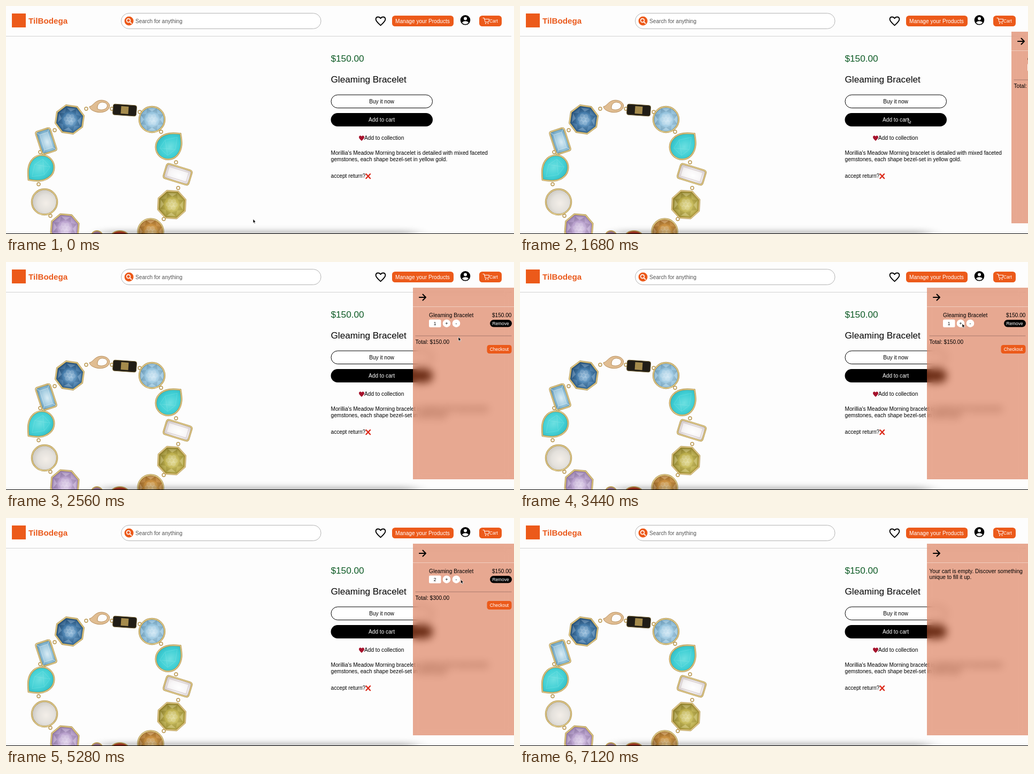
Animation, 950 px wide and 426 px high, one loop 7200 ms. Source, as an HTML page:

```html
<!DOCTYPE html>
<html lang="en">
<head>
<meta charset="utf-8">
<title>Product page with cart drawer</title>
<style>
  html, body { margin: 0; width: 100%; height: 100%; overflow: hidden; background: #fdfdfd; }
  #stage { position: relative; width: 950px; height: 426px; overflow: hidden; background: #fdfdfd; }
  svg { position: absolute; left: 0; top: 0; display: block; }
  text { font: 10.14px "Liberation Sans", Arial, sans-serif; fill: #000; white-space: pre; }
  .big { font-size: 17.2px; }
  .small { font-size: 8.4px; }
  .brand { font-size: 15.2px; font-weight: 700; fill: #ea5a1c; }
  .mid { text-anchor: middle; }
  .end { text-anchor: end; }
  .white { fill: #fff; }
  .orange { fill: #ec5a1a; }
  .line { fill: none; stroke: #000; stroke-linecap: round; stroke-linejoin: round; }
  #drawer {
    position: absolute; left: 761px; top: 48px; width: 189px; height: 358px; overflow: hidden;
    background: rgba(209, 85, 39, .5);
    -webkit-backdrop-filter: blur(8px); backdrop-filter: blur(8px);
  }
</style>
</head>
<body>
<div id="stage">
  <svg width="950" height="426" viewBox="0 0 950 426">
    <defs>
      <filter id="soft" x="-20%" y="-300%" width="140%" height="700%"><feGaussianBlur stdDeviation="16 6"/></filter>
    </defs>

    <!-- header -->
    <path d="M0 56.5H945" stroke="#d2d2d2"/>
    <rect class="orange" x="11" y="14" width="26" height="26"/>
    <text class="brand" x="42" y="33">TilBodega</text>
    <rect x="215.5" y="13.5" width="373.5" height="29" rx="14.5" fill="#fff" stroke="#b4b4b4"/>
    <circle class="orange" cx="230" cy="28" r="8.5"/>
    <g class="line" style="stroke:#fff" stroke-width="1.6"><circle cx="229" cy="27" r="3.4"/><path d="M231.6 29.6l3 3"/></g>
    <text x="242" y="31.5" style="fill:#555">Search for anything</text>
    <path class="line" stroke-width="1.9" d="M700.5 36.2C696 32 691.6 28.7 691.6 24.8C691.6 20 697.7 18.8 700.5 23.2C703.3 18.8 709.4 20 709.4 24.8C709.4 28.7 705 32 700.5 36.2Z"/>
    <rect class="orange" x="722" y="18" width="115" height="20" rx="5.5"/>
    <text class="white" x="728" y="31.5">Manage your Products</text>
    <circle cx="859" cy="26.3" r="9.3"/>
    <circle class="white" cx="859" cy="23.4" r="3"/>
    <path class="white" d="M853 31.2C854 27.2 864 27.2 865 31.2C862 34.6 856 34.6 853 31.2Z"/>
    <rect class="orange" x="885" y="18" width="42" height="20" rx="5.5"/>
    <path class="line" style="stroke:#fff" d="M892 22.5h2.2l2 7.5h6l1.6-5.5h-9"/>
    <circle class="white" cx="897" cy="32.5" r="1"/><circle class="white" cx="901.5" cy="32.5" r="1"/>
    <text class="small white" x="904" y="31">Cart</text>

    <g id="bracelet"></g>

    <!-- product details -->
    <text class="big" x="607.5" y="104" style="fill:#0c5a24">$150.00</text>
    <text class="big" x="607.5" y="143">Gleaming Bracelet</text>
    <rect x="608" y="166" width="189.5" height="24.5" rx="12.25" fill="#fff" stroke="#000"/>
    <text class="mid" x="702.5" y="181.5">Buy it now</text>
    <rect x="607.5" y="200" width="190.5" height="25" rx="12.5"/>
    <text class="mid white" x="702.5" y="216">Add to cart</text>
    <path fill="#a5122c" d="M665 252C662 249 660 247.3 660 245C660 241.7 664 241.3 665 243.8C666 241.3 670 241.7 670 245C670 247.3 668 249 665 252Z"/>
    <text x="670" y="250">Add to collection</text>
    <text x="607.5" y="278">Morillia's Meadow Morning bracelet is detailed with mixed faceted</text>
    <text x="607.5" y="289.5">gemstones, each shape bezel-set in yellow gold.</text>
    <text x="607.5" y="321">accept return?</text>
    <path d="M673.5 314l7.5 8M681 314l-7.5 8" stroke="#dc2c1c" stroke-width="2.5" stroke-linecap="round"/>

    <rect x="180" y="421" width="585" height="14" fill="#000" opacity=".3" filter="url(#soft)"/>
    <rect y="425" width="950" height="1"/>
  </svg>

  <div id="drawer">
    <svg width="189" height="358" viewBox="761 48 189 358">
      <path d="M761 83.5H950" stroke="#f1cdbf"/>
      <path class="line" stroke-width="2.1" d="M773 66H785M779.5 60.5L785 66L779.5 71.5"/>
      <g id="filled">
        <text x="791" y="102.5">Gleaming Bracelet</text>
        <text class="end" x="945.5" y="102.5">$150.00</text>
        <rect class="white" x="791" y="107.5" width="22.5" height="14.5" rx="2.5"/>
        <text id="count" class="small mid" x="802" y="117.5">1</text>
        <circle class="white" cx="824" cy="114.7" r="7.3"/><text class="small mid" x="824" y="117.5">+</text>
        <circle class="white" cx="842" cy="114.7" r="7.3"/><text class="small mid" x="842" y="117.5">-</text>
        <rect x="905" y="108" width="41" height="13.5" rx="6.75"/>
        <text class="small mid white" x="925" y="117.5">Remove</text>
        <path d="M765.5 138H945.5" stroke="#c8917f" stroke-width="2"/>
        <text id="total" x="765.5" y="152.5">Total: $150.00</text>
        <rect class="orange" x="899.5" y="155" width="46" height="16" rx="4.5"/>
        <text class="small mid white" x="922.5" y="165.7">Checkout</text>
      </g>
      <g id="empty">
        <text x="765.5" y="102.5">Your cart is empty. Discover something</text>
        <text x="765.5" y="114">unique to fill it up.</text>
      </g>
    </svg>
  </div>

  <svg width="950" height="426" viewBox="0 0 950 426">
    <path id="cursor" d="M0 0V7.5L1.7 6L2.9 8.7L4.1 8.2L3 5.6H5.2Z" stroke="#fff" stroke-width=".7"/>
  </svg>
</div>

<script>
const $ = id => document.getElementById(id);

// Bracelet
const ring = (n, r, turn = 0) => Array.from({ length: n }, (_, i) => {
  const a = (i + turn) * 2 * Math.PI / n;
  return [(r * Math.cos(a)).toFixed(1), (r * Math.sin(a)).toFixed(1)];
});
const poly = points => `M${points.join("L")}Z`;
const box = (w, h, r) => `M${-w / 2 + r} ${-h / 2}h${w - 2 * r}q${r} 0 ${r} ${r}v${h - 2 * r}q0 ${r} ${-r} ${r}h${2 * r - w}q${-r} 0 ${-r} ${-r}v${2 * r - h}q0 ${-r} ${r} ${-r}Z`;
const outlines = {
  octagon: poly(ring(8, 27.3, .5)),
  circle: "M-23.7 0A23.7 23.7 0 1 1 23.7 0A23.7 23.7 0 1 1 -23.7 0Z",
  drop: "M0 -32C9 -25 23 -15 23 2A23 23 0 0 1 -23 2C-23 -15 -9 -25 0 -32Z",
  bar: box(28, 44, 4),
  slab: box(49, 28, 5)
};
const gems = [
  // shape, x, y, rotation, light, mid, dark, faceted
  ["octagon", 119, 212, 8, "#7fb0d6", "#4379a8", "#1f4a74", 1],
  ["bar", 75, 252.5, -18, "#cfe7f2", "#93c3db", "#6a9fbe", 0],
  ["drop", 65.5, 303, -133, "#6cdfe0", "#45d2d6", "#2fb9c2", 0],
  ["circle", 72, 366, 0, "#f3eee8", "#e4e1dc", "#c8c5be", 0],
  ["octagon", 110, 415, 5, "#d9c8e6", "#b8a0cc", "#9078aa", 1],
  ["circle", 273, 212, 0, "#c4e1f2", "#96c4de", "#6ba0c2", 1],
  ["drop", 304.5, 262, 43, "#6cdfe0", "#41d0d5", "#2fb9c2", 0],
  ["slab", 321, 314.5, 17, "#ffffff", "#f0ecee", "#d5cdce", 0],
  ["octagon", 310, 371, 3, "#dcd27c", "#bcae4c", "#877a28", 1],
  ["circle", 270.5, 421.5, 0, "#e2b868", "#c98f40", "#a06a2a", 1]
];
const links = [[91, 232], [64, 273], [61, 333], [83, 392], [150, 192], [198, 192], [250, 198], [290, 235], [318, 292], [322, 340], [295, 398]];

// Alternating light and dark wedges around a speckled centre
const inner = ring(8, 15), outer = ring(8, 23, .5);
const facets = outer.map((p, i) => {
  const next = (i + 1) % 8;
  return `<path d="${poly([inner[i], p, inner[next]])}" fill="#000" opacity=".07"/>
    <path d="${poly([p, inner[next], outer[next]])}" fill="#fff" opacity="${i % 2 ? .2 : .08}"/>`;
}).join("") + ring(6, 7).concat([[0, 0]]).map(([x, y]) => `<circle cx="${x}" cy="${y}" r="4.5" fill="#fff" opacity=".18"/>`).join("");
const insides = {
  bar: '<path d="M-8 -15H8V15H-8ZM-13 -21L-8 -15M13 -21L8 -15M-13 21L-8 15M13 21L8 15" fill="#fff3" stroke="#fff6"/>',
  slab: '<path d="M-19 -9H19V9H-19Z" fill="#fff8" stroke="#d9d0d2"/>',
  drop: '<path d="M-13 -4L0 -23L13 -4L10 14L-10 14ZM-13 -4L10 14M13 -4L-10 14" fill="none" stroke="#fff2"/>'
};

const drawGem = ([shape, x, y, turn, light, mid, dark, faceted], i) => `
  <radialGradient id="gem${i}" cx=".56" cy=".55" r=".6">
    <stop offset="0" stop-color="${light}"/><stop offset=".55" stop-color="${mid}"/><stop offset="1" stop-color="${dark}"/>
  </radialGradient>
  <g transform="translate(${x} ${y}) rotate(${turn})" stroke-linejoin="round">
    <path d="${outlines[shape]}" fill="url(#gem${i})" stroke="#a98a42" stroke-width="3"/>
    <path d="${outlines[shape]}" fill="none" stroke="#f0dea0" stroke-width="1.2"/>
    ${faceted ? facets : insides[shape] || ""}
  </g>`;

$("bracelet").innerHTML =
  links.map(([x, y]) => `<circle cx="${x}" cy="${y}" r="3" fill="none" stroke="#b8954c" stroke-width="1.4"/>`).join("") +
  `<path d="M156 188C163 187 166 176 178 176C189 176 196 183 193 190C190 198 176 201 166 197C161 195 157 193 156 188Z" fill="#e0bd92" stroke="#b88f5c"/>
   <path d="M171 188C172 182 177 179 182 180C189 181 191 186 188 190C184 195 175 195 171 192Z" fill="#fdfdfd" stroke="#b88f5c"/>
   <g transform="translate(222 194.5) rotate(4)">
     <path d="${box(44, 20, 4)}" fill="#211d16" stroke="#6c5a2c"/>
     <rect x="-7" y="-7" width="14" height="14" fill="#a58b4c"/>
   </g>
   <g stroke="#c2a255" stroke-width="2">
     <circle cx="170" cy="431" r="11" fill="#96718b"/>
     <ellipse cx="213" cy="432" rx="17" ry="12" fill="#b43a25"/>
   </g>` +
  gems.map(drawGem).join("");

// Timeline
const LOOP = 7200, STEP = 80, PRICE = 150;
const OPEN_AT = 1624, OPEN_FOR = 400, REMOVE_AT = 5760;
const pointer = [
  [0, 462, 398], [320, 462, 398], [1200, 726, 211], [1840, 726, 211], [2400, 846, 140], [2640, 846, 140],
  [3200, 827, 115], [4320, 827, 115], [4480, 830.5, 117], [4640, 841, 115], [5200, 841, 115],
  [5600, 932, 114], [6400, 932, 114], [7040, 834, 416], [7120, 830, 440], [7200, 830, 440]
];
const quantities = [[0, 1], [3600, 2], [3920, 3], [4240, 4], [4800, 3], [5040, 2]];

const smooth = u => u * u * (3 - 2 * u);
const clamp = u => Math.min(1, Math.max(0, u));

function pointerAt(t) {
  const i = pointer.findIndex(p => p[0] > t);
  const [t0, x0, y0] = pointer[i - 1], [t1, x1, y1] = pointer[i];
  const u = smooth((t - t0) / (t1 - t0));
  return [x0 + (x1 - x0) * u, y0 + (y1 - y0) * u];
}

// CSS "ease" curve, cubic-bezier(.25, .1, .25, 1)
function ease(x) {
  const curve = (a, b, s) => 3 * a * s * (1 - s) ** 2 + 3 * b * s * s * (1 - s) + s ** 3;
  let low = 0, high = 1;
  for (let i = 0; i < 20; i++) {
    const s = (low + high) / 2;
    if (curve(.25, .25, s) < x) low = s; else high = s;
  }
  return curve(.1, 1, low);
}

function render(time) {
  const t = Math.floor((time % LOOP) / STEP) * STEP;
  const open = ease(clamp((t - OPEN_AT) / OPEN_FOR));
  $("drawer").style.visibility = t > OPEN_AT ? "visible" : "hidden";
  $("drawer").style.transform = `translateX(${Math.round(189 * (1 - open))}px)`;

  const quantity = quantities.filter(q => q[0] <= t).pop()[1];
  $("count").textContent = quantity;
  $("total").textContent = `Total: $${(quantity * PRICE).toFixed(2)}`;
  $("filled").style.display = t < REMOVE_AT ? "" : "none";
  $("empty").style.display = t < REMOVE_AT ? "none" : "";
  $("cursor").setAttribute("transform", `translate(${pointerAt(t)})`);
}

const start = performance.now();
function tick() {
  render(performance.now() - start);
  requestAnimationFrame(tick);
}
tick();
</script>
</body>
</html>
```
